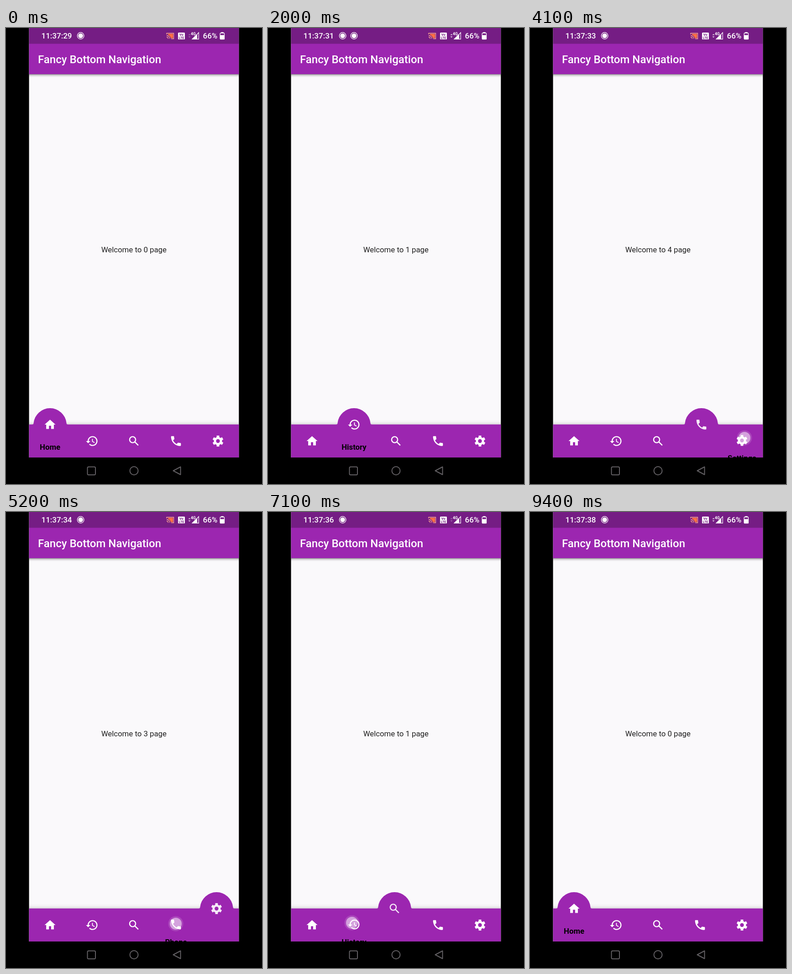
Recreate the animation shown at these times as an HTML page. Size 561 px wide and 998 px high, loop 9700 ms.

```html
<!DOCTYPE html>
<html lang="en">
<head>
<meta charset="utf-8">
<title>Fancy Bottom Navigation</title>
<style>
  html, body { margin: 0; width: 100%; height: 100%; overflow: hidden; background: #000; }
  svg { display: block; width: 561px; height: 998px; font-family: Roboto, sans-serif; }
  .status { font-size: 17px; font-weight: 500; fill: #fff; }
  .label { font-size: 16.8px; font-weight: 700; text-anchor: middle; }
  .line { fill: none; stroke: #fff; }
  .keys { fill: none; stroke: #625f63; stroke-width: 2; stroke-linejoin: round; }
</style>
</head>
<body>
<svg viewBox="0 0 561 998">
  <defs>
    <linearGradient id="below" x2="0" y2="1">
      <stop offset="0" stop-opacity=".42"/><stop offset=".45" stop-opacity=".12"/><stop offset="1" stop-opacity="0"/>
    </linearGradient>
    <linearGradient id="above" x2="0" y2="1">
      <stop offset="0" stop-opacity="0"/><stop offset=".5" stop-opacity=".03"/><stop offset="1" stop-opacity=".13"/>
    </linearGradient>
    <clipPath id="screen"><path d="M50.5 0H510.3V940H50.5Z"/></clipPath>

    <g id="home"><path d="M10 20v-6h4v6h5v-8h3L12 3 2 12h3v8z"/></g>
    <g id="history"><path d="M13 3c-4.97 0-9 4.03-9 9H1l3.89 3.89.07.14L9 12H6c0-3.87 3.13-7 7-7s7 3.13 7 7-3.13 7-7 7c-1.93 0-3.68-.79-4.94-2.06l-1.42 1.42C8.27 19.99 10.51 21 13 21c4.97 0 9-4.03 9-9s-4.03-9-9-9zm-1 5v5l4.28 2.54.72-1.21-3.5-2.08V8z"/></g>
    <g id="search" class="line" stroke-width="2"><circle cx="9.5" cy="9.5" r="5.5"/><path d="M13.5 13.5l6.3 6.3"/></g>
    <g id="phone"><path d="M6.62 10.79c1.44 2.83 3.76 5.14 6.59 6.59l2.2-2.2c.27-.27.67-.36 1.02-.24 1.12.37 2.33.57 3.57.57.55 0 1 .45 1 1V20c0 .55-.45 1-1 1-9.39 0-17-7.61-17-17 0-.55.45-1 1-1h3.5c.55 0 1 .45 1 1 0 1.25.2 2.45.57 3.57.11.35.03.74-.25 1.02z"/></g>
    <path id="tooth" class="line" stroke-width="4.8" d="M12 2.1V6.5M12 17.5V21.9"/>
    <g id="settings">
      <circle class="line" cx="12" cy="12" r="5.5" stroke-width="4"/>
      <use href="#tooth"/><use href="#tooth" transform="rotate(60 12 12)"/><use href="#tooth" transform="rotate(120 12 12)"/>
    </g>
    <g id="dot"><circle class="line" r="7.3" stroke-width="1.3"/><circle r="5.2" fill="#fff"/></g>
  </defs>

  <g clip-path="url(#screen)">
    <rect x="50" width="461" height="940" fill="#faf9fb"/>
    <rect x="50" y="101" width="461" height="7" fill="url(#below)"/>
    <rect x="50" y="34" width="461" height="67" fill="#9c26b0"/>
    <rect x="50" width="461" height="34.5" fill="#751d84"/>
    <text x="70" y="77" font-size="24" font-weight="500" fill="#fff">Fancy Bottom Navigation</text>
    <text id="page" x="280.3" y="490.5" font-size="16.8" text-anchor="middle" fill="#202020"></text>

    <text id="clock" class="status" x="77.5" y="23"></text>
    <use href="#dot" x="163.6" y="17"/>
    <use href="#dot" id="dot2" x="188.5" y="17"/>
    <g>
      <path d="M355 13H366V22H361Q360 17 355 15Z" fill="#ff7043"/>
      <path d="M352 14V11.5H367.5V23.5H362M352 16.5A7 7 0 0 1 359 23.5M352 20A3.5 3.5 0 0 1 355.5 23.5" fill="none" stroke="#ffab91" stroke-width="1.3"/>
    </g>
    <rect x="377" y="10" width="15" height="15" rx="1.5" fill="#fff"/>
    <g font-weight="700" text-anchor="middle" fill="#751d84">
      <text x="384.3" y="17" font-size="7.5">Vo</text><text x="384.5" y="24" font-size="7">LTE</text>
    </g>
    <path id="arrows" d="M399.5 15.5L402 13L404.5 15.5ZM399.5 18.5L402 21L404.5 18.5Z" fill="#fff"/>
    <path d="M422.3 10V24.4H408Z" class="line" stroke-width="1.2"/>
    <path d="M419 13V24.5H407.5Z" fill="#fff"/>
    <text x="405" y="16" font-size="8.5" font-weight="700" fill="#fff">4G</text>
    <text class="status" x="431.5" y="23">66%</text>
    <path d="M471.5 11V9H476.5V11" fill="#fff"/>
    <rect x="469.2" y="11" width="9.3" height="13.6" rx="1.3" class="line" stroke-width="1.3"/>
    <path d="M469 15.5H479V25H469Z" fill="#fff"/>

    <rect x="50" y="857" width="461" height="11" fill="url(#above)"/>
    <rect x="50" y="867.7" width="461" height="73" fill="#9c26b0"/>
    <path id="bump" fill="#9c26b0" d="M-40 868Q-36 868-36 864.5A36.2 36.2 0 0 1 36 864.5Q36 868 40 868V880H-40Z"/>
    <g id="tabs" fill="#fff"></g>
    <g id="held" fill="#fff"><use/></g>
    <g id="touch" fill="#fff"><circle r="16.5" opacity=".14"/><circle r="13" opacity=".5"/></g>
  </g>

  <g class="keys">
    <rect x="178.5" y="960.5" width="17.5" height="17.5" rx="2.5"/>
    <circle cx="280.5" cy="969" r="9"/>
    <path d="M382.5 960.5V977.5L366.5 969Z"/>
  </g>
</svg>
<script>
const LOOP = 9700, MOVE = 300;
const REST = 904, RAISED = 868, GONE = 840;
const names = ['Home', 'History', 'Search', 'Phone', 'Settings'];
// [time, tab]
const moves = [[-1000, 0], [960, 1], [2160, 2], [2860, 3], [4095, 4], [5195, 3], [6595, 2], [7095, 1], [7620, 0]];
// [time, x, y]
const taps = [[100, 96, 902], [900, 188, 900], [2090, 278, 899], [2800, 370, 900], [3400, 475, 878], [4030, 470, 897],
  [5130, 372, 901], [5900, 277, 899], [6530, 273, 899], [7030, 184, 899], [7550, 90, 896], [8100, 88, 894], [9000, 82, 892]];

const $ = id => document.getElementById(id);
const clamp = v => Math.min(1, Math.max(0, v));
const mix = (a, b, k) => a + (b - a) * k;
const tabX = i => 96.5 + 92 * i;
const last = (list, t) => list.findLastIndex(e => e[0] <= t);

function make(tag, parent, attrs) {
  const el = document.createElementNS('http://www.w3.org/2000/svg', tag);
  for (const k in attrs) el.setAttribute(k, attrs[k]);
  return parent.appendChild(el);
}

function place(el, x, y, alpha) {
  el.setAttribute('transform', `translate(${x} ${y})`);
  el.setAttribute('opacity', alpha);
}

function placeIcon(el, x, y, alpha) {
  el.setAttribute('transform', `translate(${x} ${y}) scale(1.2) translate(-12 -12)`);
  el.setAttribute('opacity', alpha);
}

const tabs = names.map(name => {
  const icon = make('g', $('tabs'), {});
  make('use', icon, { href: '#' + name.toLowerCase() });
  const label = make('text', $('tabs'), { class: 'label', fill: '#000' });
  label.textContent = name;
  return { icon, label };
});
const heldIcon = $('held').firstElementChild;

function draw(t) {
  const n = last(moves, t), [start, tab] = moves[n];
  const prev = n ? moves[n - 1][1] : tab;
  const age = t - start, p = clamp(age / MOVE);
  const x = mix(tabX(prev), tabX(tab), 1 - (1 - p) ** 1.7);

  $('page').textContent = `Welcome to ${tab} page`;
  $('clock').textContent = '11:37:' + (29 + Math.floor(t / 1000));
  $('dot2').setAttribute('opacity', t >= 1000 && t < 3000 ? 1 : 0);
  $('arrows').setAttribute('opacity', t >= 200 && t < 6000 || t >= 9000 ? .85 : .35);

  place($('bump'), x, 0, 1);
  tabs.forEach(({ icon, label }, i) => {
    const on = i === tab;
    const lift = on ? p : i === prev ? 1 - p : 0;
    const alpha = on ? 1 - p : i === prev ? p ** 1.7 : 1;
    placeIcon(icon, tabX(i), mix(REST, GONE, lift), alpha);
    place(label, tabX(i), mix(947.5, 923, lift), on ? 1 : 0);
  });

  // The raised icon swaps while it is faded out.
  const leaving = age < 100;
  heldIcon.setAttribute('href', '#' + names[leaving ? prev : tab].toLowerCase());
  placeIcon($('held'), x, RAISED, leaving ? 1 - clamp(age / 60) : clamp((age - 240) / 60));

  const tap = taps[last(taps, t)];
  if (tap) place($('touch'), tap[1], tap[2], 1 - clamp((t - tap[0] - 80) / 210));
  else place($('touch'), 0, 0, 0);
}

const begin = performance.now();
function tick() {
  draw((performance.now() - begin) % LOOP);
  requestAnimationFrame(tick);
}
tick();
</script>
</body>
</html>
```
